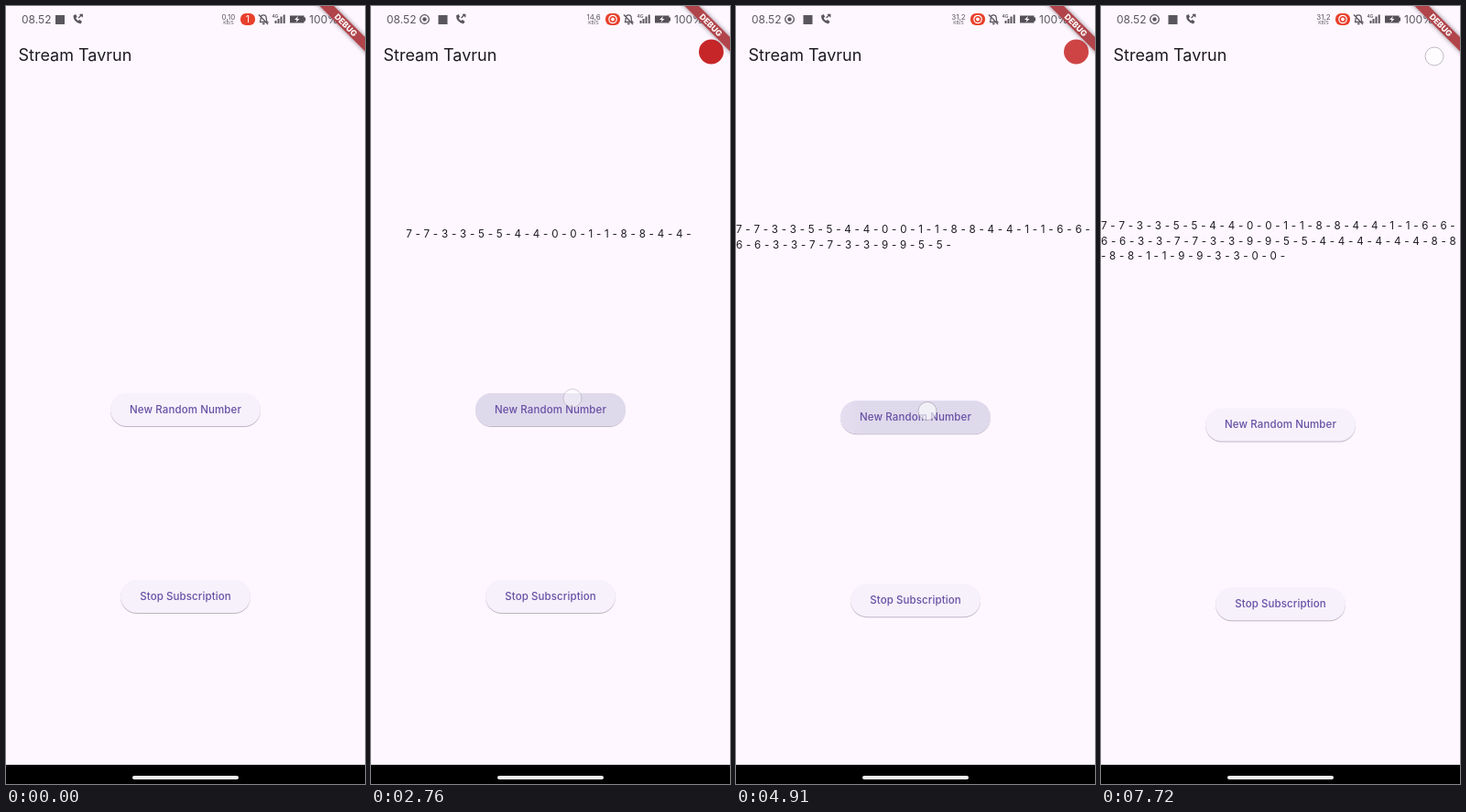
An HTML page for the animation above (7750 ms loop, 392 by 850 pixels).

```html
<!DOCTYPE html>
<html lang="en">
<head>
<meta charset="utf-8">
<title>Random number stream</title>
<style>
  html, body { margin: 0; width: 100%; height: 100%; overflow: hidden; background: #fef7ff; }
  svg { display: block; width: 392px; height: 850px; font-family: Inter, Roboto, sans-serif; }
  .status { fill: #5a565e; font-size: 12px; }
  .small { font-size: 8px; text-anchor: middle; }
  .tiny { font-size: 5px; text-anchor: middle; }
  .body { fill: #1d1b20; font-size: 11.6px; letter-spacing: .25px; white-space: pre; }
  .label { fill: #6750a4; font-size: 11.5px; font-weight: 500; letter-spacing: .1px; text-anchor: middle; }
  .line { fill: none; stroke: #5a565e; stroke-width: 1.3; }
  .raised { fill: #f6f1fb; filter: drop-shadow(0 1px .7px rgba(60, 50, 80, .33)); }
</style>
</head>
<body>
<svg viewBox="0 0 392 850">
  <defs>
    <radialGradient id="ink">
      <stop offset=".65" stop-color="#dfd9ec"/>
      <stop offset="1" stop-color="#dfd9ec" stop-opacity="0"/>
    </radialGradient>
    <clipPath id="pill"><rect x="114" y="423" width="164" height="36" rx="18"/></clipPath>
  </defs>
  <rect width="392" height="850" fill="#fef7ff"/>

  <!-- Status bar -->
  <text class="status" x="17" y="19">08.52</text>
  <g id="recIcon" class="line">
    <circle cx="58.5" cy="14.5" r="4.8"/>
    <circle cx="58.5" cy="14.5" r="1.6" fill="#5a565e"/>
  </g>
  <g id="notices">
    <rect x="54" y="10" width="10" height="10" fill="#5a565e"/>
    <path d="M73.5 10.5q0 7 8 9l1.5-2.5-2.5-2-1.8 1q-1.8-1-2.4-2.8l1.3-1.5-1.5-2.7z" fill="#5a565e"/>
    <path class="line" d="M79 13l4-3.5M80.5 9.5h2.8v2.8"/>
  </g>
  <text id="speed" class="status small" x="243" y="15.3"></text>
  <text class="status tiny" x="243" y="20">KB/S</text>
  <rect x="256" y="8" width="16" height="13" rx="6" fill="#e8402c"/>
  <text id="badge" x="264" y="18.3" font-size="10.5" fill="#fff" text-anchor="middle">1</text>
  <g id="badgeRec" fill="none" stroke="#fff" stroke-width="1.2">
    <circle cx="264" cy="14.5" r="4.2"/>
    <circle cx="264" cy="14.5" r="1.3" fill="#fff"/>
  </g>
  <path class="line" d="M277 17.5h8.5q-1.3-1-1.3-4.3t-3-3.3-3 3.3-1.2 4.3M280 19.5h2.5M276 9.5l10 10.5"/>
  <text class="status tiny" x="294" y="12.5" font-weight="600">4G</text>
  <path d="M293.5 19v-3h2v3zM296.5 19v-5h2v5zM299.5 19v-7.5h2v7.5zM302.7 19v-9.5h2v9.5z" fill="#5a565e"/>
  <path d="M310 10.5h15.5v2h1.5v4h-1.5v2h-15.5z" fill="#545058"/>
  <path d="M319 11l-4 4h2.5l-1 3 4-4h-2.5z" fill="#fef7ff"/>
  <text class="status" x="331" y="19">100%</text>

  <text x="13.5" y="60" font-size="18" fill="#1d1b20">Stream Tavrun</text>

  <g id="numbers"></g>

  <!-- Buttons -->
  <g id="newButton">
    <rect class="raised" x="114" y="423" width="164" height="36" rx="18"/>
    <g clip-path="url(#pill)">
      <rect id="overlay" x="114" y="423" width="164" height="36" fill="#ebe3f3"/>
      <circle id="splash" fill="url(#ink)"/>
    </g>
    <text class="label" x="196" y="444.7">New Random Number</text>
  </g>
  <g id="stopButton">
    <rect class="raised" x="125" y="627" width="142" height="36" rx="18"/>
    <text class="label" x="196" y="649">Stop Subscription</text>
  </g>

  <circle id="recorder" cx="371.5" cy="50" r="13.5"/>
  <circle id="touch" r="10" fill="#fff" fill-opacity=".6" stroke="#aaa4b2" stroke-opacity=".75"/>

  <g transform="translate(392 0) rotate(45)">
    <rect x="-50" y="24" width="100" height="11" fill="#b0444a" style="filter:drop-shadow(0 0 2.5px rgba(50,30,40,.55))"/>
    <text x="0" y="32.7" font-size="8.8" font-weight="800" fill="#fff" text-anchor="middle">DEBUG</text>
  </g>

  <rect y="829" width="392" height="21" fill="#000"/>
  <rect x="138" y="841" width="116" height="4" rx="2" fill="#f6f3f6"/>
</svg>

<script>
const LOOP = 7750, RECORD_START = 450, STOP_PRESS = 7440, RECORD_STOP = 7560;
const FIRST_TAP = 970, TAP_GAP = 250, HOLD = 190;
const $ = id => document.getElementById(id);

// Each tap emits its digit twice.
const stream = [...'7354018416637395444881930'].map(d => `${d} - ${d} - `);
const tapUp = i => FIRST_TAP + i * TAP_GAP;

// Keyframes: time, then values.
const finger = [[900, 222, 431], [2080, 221, 430], [3420, 219, 427], [4250, 210, 440],
                [5550, 208, 445], [6770, 205, 453]];
const red = [[2080, 192, 28, 32], [3420, 206, 48, 48], [4250, 206, 86, 88],
             [5550, 206, 50, 50], [6770, 206, 66, 68]];
const speeds = [[0, '0,10'], [RECORD_START, '14,6'], [4000, '31,2'], [5000, '28,6'], [6400, '31,2']];

function sample(keys, t) {
  const next = keys.findIndex(k => k[0] > t);
  if (next < 0) return keys.at(-1).slice(1);
  if (next === 0) return keys[0].slice(1);
  const a = keys[next - 1], b = keys[next], p = (t - a[0]) / (b[0] - a[0]);
  return a.slice(1).map((v, i) => v + (b[i + 1] - v) * p);
}

const clamp = v => Math.max(0, Math.min(1, v));
const show = (id, on) => $(id).setAttribute('visibility', on ? 'visible' : 'hidden');
const shift = (id, x, y) => $(id).setAttribute('transform', `translate(${x} ${y})`);
function set(id, attrs) {
  for (const name in attrs) $(id).setAttribute(name, attrs[name]);
}

// Draws the digits and returns how far the wrapped text pushes the first button down.
function layout(count) {
  const text = stream.slice(0, count).join('').trimEnd();
  const lines = [text.slice(0, 80), text.slice(80, 158), text.slice(158)].filter(Boolean);
  const extra = Math.max(0, lines.length - 1), push = 8.3 * extra;
  const anchor = extra ? 'x="0"' : 'x="194" text-anchor="middle"';
  $('numbers').innerHTML = lines.map((line, i) =>
    `<text class="body" ${anchor} y="${252.6 - push / 2 + 16.4 * i}">${line}</text>`).join('');
  shift('newButton', 0, push);
  shift('stopButton', 0, push / 2);
  return push;
}

function draw(t) {
  const recording = t >= RECORD_START;
  show('recIcon', recording);
  show('badgeRec', recording);
  show('badge', !recording);
  shift('notices', recording ? 19.5 : 0, 0);
  $('speed').textContent = speeds.filter(s => s[0] <= t).at(-1)[1];
  show('recorder', recording && t < RECORD_STOP);
  set('recorder', { fill: `rgb(${sample(red, t).map(Math.round)})` });

  const count = Math.floor((t - FIRST_TAP) / TAP_GAP) + 1;
  const push = layout(Math.max(0, Math.min(stream.length, count)));

  // The latest press that has begun.
  const tap = Math.min(stream.length - 1, Math.floor((t - FIRST_TAP + HOLD) / TAP_GAP));
  const age = t - tapUp(tap) + HOLD, released = Math.max(0, age - HOLD);
  const pressed = tap >= 0, fade = pressed ? clamp(1 - (released - 60) / 200) : 0;
  const stopping = t >= STOP_PRESS;
  const [x, y] = stopping ? [364, 55] : sample(finger, t);
  set('overlay', { opacity: fade });
  set('splash', { cx: x, cy: y - push, r: Math.max(0, age * .85), opacity: fade * clamp(age / 40) });
  set('touch', { cx: x, cy: y, opacity: stopping ? 1 : pressed ? clamp(1 - released / 120) : 0 });
}

const start = performance.now();
function frame(now) {
  draw(Math.max(0, now - start) % LOOP);
  requestAnimationFrame(frame);
}
draw(0);
requestAnimationFrame(frame);
</script>
</body>
</html>
```
